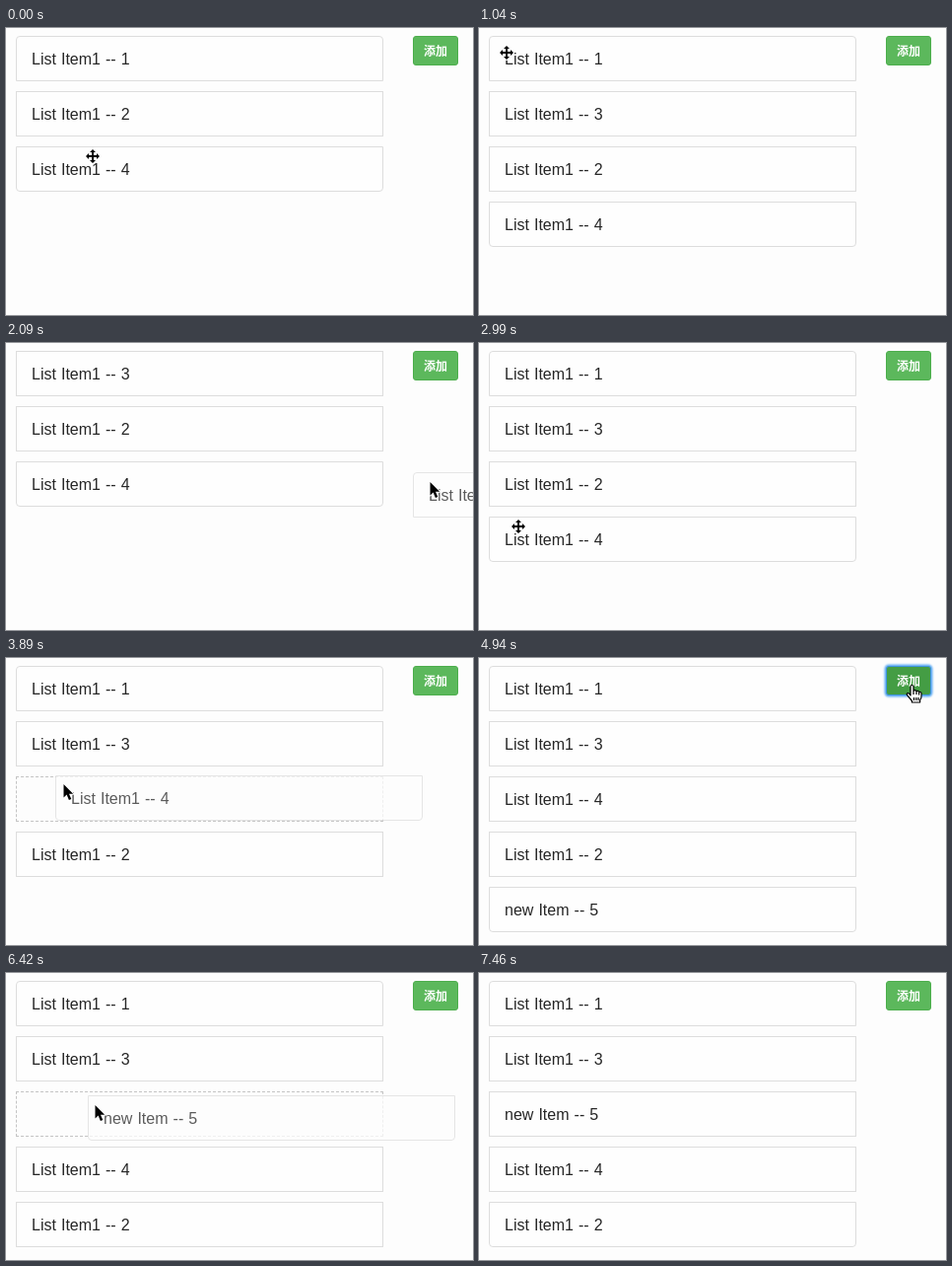
An HTML page that plays this animation: 474x291 px, repeating every 8360 ms.

```html
<!DOCTYPE html>
<html lang="zh-CN">
<head>
<meta charset="utf-8">
<title>Sortable list</title>
<style>
html, body { margin: 0; width: 100%; height: 100%; overflow: hidden; background: #fdfdfd; }
#stage { position: relative; width: 474px; height: 291px; overflow: hidden; }
.item, .hole {
  position: absolute; left: 0; top: 0; box-sizing: border-box;
  width: 373px; height: 46px; border: 1px solid #ddd;
}
.item {
  padding: 11px 15px 9px; background: #fefefe; color: #262626; white-space: nowrap;
  font: 16px/24px "Liberation Sans", Arial, sans-serif; word-spacing: .6px;
}
.hole { border: 1px dashed #c4c4c4; }
.top { border-top-left-radius: 4px; border-top-right-radius: 4px; }
.bottom { border-bottom-left-radius: 4px; border-bottom-right-radius: 4px; }
.drag { opacity: .75; z-index: 2; }
#add {
  position: absolute; left: 413px; top: 8px; box-sizing: border-box;
  width: 46px; height: 30px; text-align: center;
  border: 1px solid #4cae4c; border-radius: 3px; background: #5cb85c; color: #fff;
  font: bold 12px/28px "Noto Sans CJK SC", "Noto Sans CJK", sans-serif;
}
#add.dark { background: #449d44; border-color: #398439; }
#add.focus { border-color: #3f93e0; box-shadow: 0 0 2px 1.5px #62adf4; }
#cursor { position: absolute; left: 0; top: 0; width: 1px; height: 1px; overflow: visible; z-index: 3; }
#cursor path { stroke-linejoin: round; }
</style>
</head>
<body>
<div id="stage">
  <div class="hole" id="hole"></div>
  <div id="add">添加</div>
  <svg id="cursor">
    <path id="arrow" fill="#000" stroke="#fff" paint-order="stroke" stroke-width="2"
      d="M.5 0V13.5L3.6 10.6 5.9 16 8.3 15 6 9.8H10.2Z"/>
    <path id="move" fill="#000" stroke="#fff" paint-order="stroke" stroke-width="2"
      d="M0-7L3-4H1V-1H4V-3L7 0 4 3V1H1V4H3L0 7-3 4H-1V1H-4V3L-7 0-4-3V-1H-1V-4H-3Z"/>
    <path id="hand" fill="#fff" stroke="#000" stroke-width="1.2"
      d="M-2 8V1Q-2-.5-.6-.5T1 1V6Q1 4.6 2.4 4.7T4 6.2Q4.2 5.2 5.4 5.4T6.6 7Q7 6.2 8 6.5T9 8V11Q9 13 7.6 14.6V17H-.6V15.5L-5.6 9.4Q-6.2 8-4.8 7.6T-2 10ZM1 6V9M4 6.2V9M6.6 7V9.4M1.5 12V15M3.8 12V15M6 12V15"/>
  </svg>
</div>
<script>
const LOOP = 8360, LAST = 50;
const SHORT = [4, 39, 42, 45]; // ticks that come 10 ms early
const LEFT = 10, TOP = 8, PITCH = 56, WIDTH = 373, HEIGHT = 46;
const CLICK = 32, APPEND = 33;

// each item is held from "start" to "drop" (in ticks) and lands in "row"
const DRAGS = [
  { id: '3', start: 0, drop: 0, row: 1 },
  { id: '1', start: 8, drop: 16, row: 0 },
  { id: '4', start: 22, drop: 27, row: 2 },
  { id: '5', start: 38, drop: 45, row: 2 }
];

// pointer legs: start tick, end tick, x, y
const LEGS = [
  [0, 0, 88, 130], [1, 5, 30, 45], [6, 8, 27, 18], [8, 11, 347, 137], [11, 14, 430, 141],
  [17, 20, 40, 186], [20, 22, 18, 185], [22, 26, 58, 128], [28, 31, 440, 28],
  [33, 35, 20, 277], [36, 38, 17, 242], [38, 41, 106, 175], [41, 43, 90, 134],
  [43, 45, 92, 135], [48, 49, 116, 135]
];

const $ = id => document.getElementById(id);
const stage = $('stage'), hole = $('hole'), add = $('add'), cursor = $('cursor');
const items = {};
for (let n = 1; n <= 5; n++) {
  const el = document.createElement('div');
  el.textContent = (n < 5 ? 'List Item1' : 'new Item') + ' -- ' + n;
  items[n] = stage.insertBefore(el, add);
}

const place = (el, x, y) => { el.style.transform = `translate(${x}px, ${y}px)`; };
const show = (el, on) => { el.style.display = on ? '' : 'none'; };
const rowY = row => TOP + row * PITCH;
const rowAt = y => Math.floor((y - TOP) / PITCH);
const inList = x => x >= LEFT && x < LEFT + WIDTH;
const easeOut = f => 1 - (1 - f) ** 2;
const tickTime = i => i * 150 - 10 * SHORT.filter(s => s <= i).length;

function tickAt(ms) {
  let i = LAST;
  while (i > 0 && tickTime(i) > ms) i--;
  return i;
}

function pointerAt(tick) {
  let x = 0, y = 0;
  for (const [start, end, toX, toY] of LEGS) {
    if (tick < start) break;
    const f = tick >= end ? 1 : easeOut((tick - start) / (end - start));
    x += (toX - x) * f;
    y += (toY - y) * f;
  }
  return [Math.round(x), Math.round(y)];
}

// list order at a tick, with "_" for the drop slot, and the drag in progress
function listAt(tick, x, y) {
  const order = [...'1243'];
  for (const { id, start, drop, row } of DRAGS) {
    if (tick >= APPEND && start > APPEND || id === '5' && tick >= APPEND) order.push('5');
    if (tick < start) break;
    const home = order.indexOf(id), last = home === order.length - 1;
    order.splice(home, 1);
    if (tick < drop) {
      if (inList(x)) order.splice(rowAt(y), 0, '_');
      const [px, py] = pointerAt(start);
      return { order, held: { id, home, last, x: x - px + LEFT, y: y - py + rowY(home) } };
    }
    // a moved item shows up one tick after its drop
    if (tick > drop || row === home) order.splice(row, 0, id);
  }
  return { order };
}

function drawList({ order, held }) {
  for (const el of Object.values(items)) show(el, false);
  show(hole, order.includes('_'));
  const style = (el, top, bottom, drag) => {
    el.className = 'item' + (top ? ' top' : '') + (bottom ? ' bottom' : '') + (drag ? ' drag' : '');
    show(el, true);
  };
  order.forEach((id, row) => {
    const el = items[id] || hole;
    place(el, LEFT, rowY(row));
    if (el !== hole) {
      style(el, row === 0 && held?.home !== 0, row === order.length - 1 && !held?.last);
    }
  });
  if (held) {
    style(items[held.id], held.home === 0, held.last, true);
    place(items[held.id], held.x, held.y);
  }
}

function draw(tick) {
  const [x, y] = pointerAt(tick);
  const list = listAt(tick, x, y);
  drawList(list);

  const row = rowAt(y);
  const onItem = inList(x) && row >= 0 && row < list.order.length && y < rowY(row) + HEIGHT;
  const onButton = x >= 413 && x < 459 && y >= 8 && y < 38;
  const kind = list.held ? 'arrow' : onButton ? 'hand' : onItem ? 'move' : 'arrow';
  for (const id of ['arrow', 'move', 'hand']) show($(id), id === kind);
  place(cursor, x, y);
  show(cursor, tick < LAST);

  const focus = tick >= CLICK && tick < DRAGS[3].start;
  add.classList.toggle('focus', focus);
  add.classList.toggle('dark', focus || onButton);
}

let shown = -1;
function frame() {
  const tick = tickAt(performance.now() % LOOP);
  if (tick !== shown) draw(shown = tick);
  requestAnimationFrame(frame);
}
frame();
</script>
</body>
</html>
```
